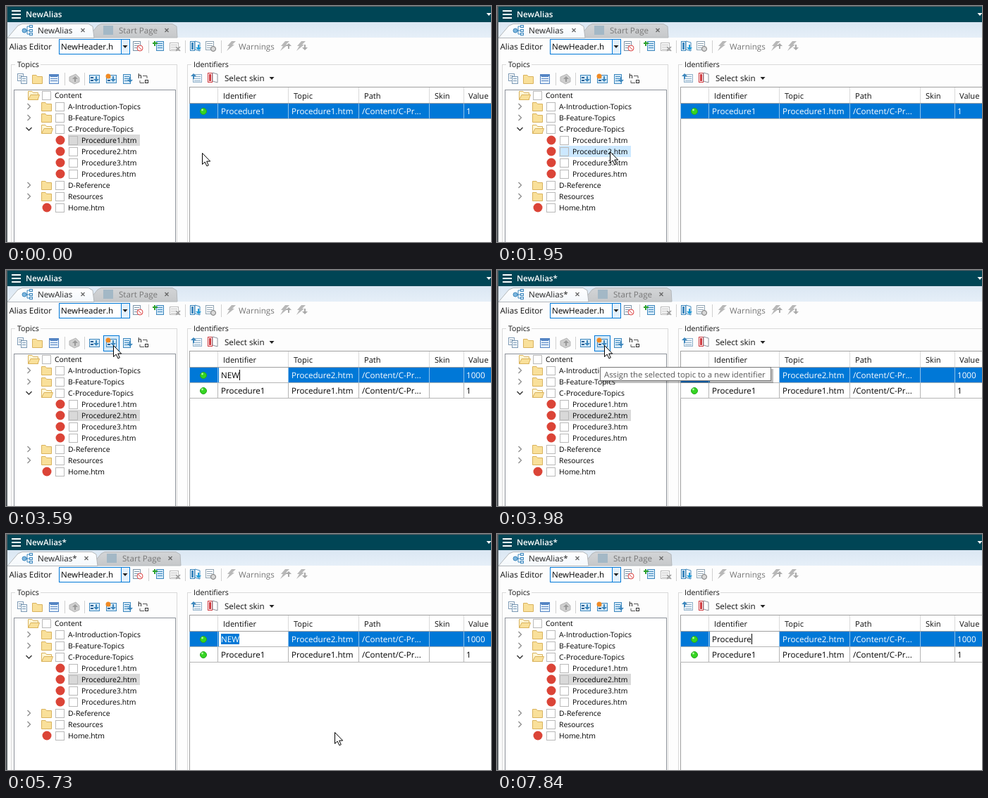
An HTML page with a canvas for the animation above (8 s loop, 688 by 336 pixels).

```html
<!DOCTYPE html>
<html lang="en">
<head>
<meta charset="utf-8">
<title>Alias editor</title>
<style>
html, body { margin: 0; width: 100%; height: 100%; overflow: hidden; background: #fdfdfd; }
canvas { display: block; }
</style>
</head>
<body>
<canvas id="stage" width="688" height="336"></canvas>
<script>
const ctx = document.getElementById('stage').getContext('2d');
const LOOP = 8000;
const BLUE = '#0078d7', LINE = '#d9d9d9', ICON = '#3d87bd', PALE = '#d6eaf8', GREY = '#b8b8b8';

// Moments at which the interface changes state
const PICK = 1830, HOVER = 3200, PRESS = 3350, ADD = 3470, RENAME_TAB = 3600, TOOLTIP = 3720,
      TAB_SHIFT = 3860, LEAVE = 4130, TIP_HIDE = 4400, CARET_OFF = 4790, SELECT = 5060, BLINK = 5730;
const KEYS = [6260, 6660, 6780, 7180, 7310, 7450, 7570, 7720, 7840];

// Pointer steps: time, x, y, shape
const POINTER = [
  [0, 278, 209], [710, 277, 209], [860, 269, 208], [1010, 233, 208], [1160, 190, 207],
  [1290, 166, 207], [1430, 160, 207], [2540, 159, 205], [2690, 155, 188], [2810, 147, 159],
  [2930, 145, 130], [3050, 146, 117], [3200, 152, 107], [4130, 381, 158], [4250, 374, 158],
  [4400, 373, 176], [4550, 366, 156, 'beam'], [4670, 362, 154, 'beam'], [4790, 356, 154, 'beam'],
  [4910, 345, 154, 'beam'], [5060, 261, 150], [5180, 400, 230], [5300, 466, 282], [6260, 0, 0, 'none']
];

function rect(x, y, w, h, color) {
  ctx.fillStyle = color;
  ctx.fillRect(x, y, w, h);
}
function box(x, y, w, h, stroke, fill) {
  if (fill) rect(x, y, w, h, fill);
  ctx.strokeStyle = stroke;
  ctx.lineWidth = 1;
  ctx.strokeRect(x + .5, y + .5, w - 1, h - 1);
}
function path(points, { fill, stroke, width = 1, close = true }) {
  ctx.beginPath();
  for (let i = 0; i < points.length; i += 2) ctx.lineTo(points[i], points[i + 1]);
  if (close) ctx.closePath();
  if (fill) { ctx.fillStyle = fill; ctx.fill(); }
  if (stroke) { ctx.strokeStyle = stroke; ctx.lineWidth = width; ctx.stroke(); }
}
const polyline = (points, stroke, width = 1) => path(points, { stroke, width, close: false });
function disc(x, y, r, fill, stroke) {
  ctx.beginPath();
  ctx.arc(x, y, r, 0, 2 * Math.PI);
  if (fill) { ctx.fillStyle = fill; ctx.fill(); }
  if (stroke) { ctx.strokeStyle = stroke; ctx.lineWidth = 1; ctx.stroke(); }
}
function fade(top, bottom, from, to) {
  const gradient = ctx.createLinearGradient(0, top, 0, bottom);
  gradient.addColorStop(0, from);
  gradient.addColorStop(1, to);
  return gradient;
}
function setFont(size, bold) {
  ctx.font = `${bold ? 600 : 400} ${size}px "Open Sans", sans-serif`;
}
function text(str, x, y, { size = 11.6, color = '#000', bold = false } = {}) {
  setFont(size, bold);
  ctx.fillStyle = color;
  ctx.fillText(str, x, y);
}
function widthOf(str) {
  setFont(11.6);
  return ctx.measureText(str).width;
}
const down = (x, y, color = '#222') => path([x - 3.5, y - 2, x + 3.5, y - 2, x, y + 2], { fill: color });
const separator = (x, y) => rect(x, y, 1, 18, '#d0d0d0');

// Icons, placed by their centre
function page(x, y, color = ICON, w = 10, h = 12, fill = '#fff') {
  const left = Math.round(x - w / 2), top = Math.round(y - h / 2);
  box(left, top, w, h, color, fill);
  for (let i = 3; i < h - 2; i += 3) rect(left + 2, top + i, w - 4, 1, color);
}
function folder(x, y, open) {
  const edge = '#d9b25c';
  path([x - 7.5, y - 5.5, x - 2, y - 5.5, x - .5, y - 3.5, x + 6.5, y - 3.5, x + 6.5, y + 6.5, x - 7.5, y + 6.5],
    { fill: open ? '#fff6d6' : '#f9e09a', stroke: edge });
  if (open) path([x - 7.5, y + 6.5, x - 4, y - .5, x + 8.5, y - .5, x + 6, y + 6.5], { fill: '#f9e09a', stroke: edge });
}
function bolt(x, y) {
  path([x + 1, y - 7, x + 7, y - 7, x + 2, y - 2, x + 5, y - 2, x - 6, y + 7, x - 2, y, x - 5, y], { fill: GREY });
}
function arrow(x, y, color, dir) {
  path([x - 4, y, x, y + 4 * dir, x + 4, y], { fill: color });
  rect(x - 1, Math.min(y, y - 4 * dir), 2, 4, color);
}
function cross(x, y, r, color, width = 1.2) {
  polyline([x - r, y - r, x + r, y + r], color, width);
  polyline([x + r, y - r, x - r, y + r], color, width);
}
function plus(x, y, color) {
  rect(x - 3, y - 1, 7, 2, color);
  rect(x - 1, y - 3, 2, 7, color);
}
function assignIcon(x, y, star) {
  box(x - 7, y - 5, 15, 12, ICON, PALE);
  rect(x - 5, y - 2, 4, 2, '#2a5f94');
  rect(x - 5, y + 2, 4, 2, '#2a5f94');
  arrow(x + 3, y + 1, ICON, 1);
  if (star) disc(x - 4, y - 3, 3.5, '#f08a24');
}
function book(x, y, left, right) {
  box(x - 7, y - 7, 7, 14, left, '#fff');
  rect(x - 5, y - 5, 3, 10, left);
  path([x, y - 7, x + 7, y - 5, x + 7, y + 7, x, y + 5], { fill: '#fff', stroke: right });
}

function drawTitleAndTabs(t) {
  const name = t < RENAME_TAB ? 'NewAlias' : 'NewAlias*';
  const grow = t < RENAME_TAB ? 0 : 5, shift = t < TAB_SHIFT ? 0 : 5;
  rect(0, 1, 688, 22, '#004555');
  for (const y of [6, 11, 16]) rect(8, y, 13, 2, '#fff');
  text(name, 28, 16, { color: '#fff', bold: true });
  down(685, 12, '#fff');

  rect(0, 23, 688, 22, fade(23, 45, '#dbe7f3', '#e6eff8'));
  const s = shift;
  path([116 + s, 45, 130 + s, 28, 135 + s, 25.5, 236 + s, 25.5, 242 + s, 29, 243 + s, 45],
    { fill: fade(25, 45, '#d3d5d7', '#c6c8ca'), stroke: '#b3b7ba' });
  rect(138 + s, 28, 14, 13, '#a3b8c6');
  text('Start Page', 160 + s, 38.5, { color: '#777' });
  cross(228 + s, 34.5, 2.5, '#666');

  path([2, 45.5, 17, 28, 23, 25.5, 117 + s, 25.5, 123 + s, 29, 125 + s, 45.5],
    { fill: fade(25, 45, '#fff', '#f4f8fc'), stroke: '#b3b7ba' });
  for (const y of [29, 35, 40]) polyline([25, 35, 30, 35, 30, y, 34, y], ICON);
  disc(26, 35, 3, '#7db6de', ICON);
  for (const y of [27, 33, 38]) box(33, y, 5, 4, ICON, PALE);
  text(name, 45, 38.5, { color: '#222' });
  cross(109 + grow, 34.5, 2.5, '#666');
}

function drawEditorBar() {
  rect(0, 45, 688, 291, '#fdfdfd');
  text('Alias Editor', 4.5, 61.5, { color: '#111' });
  box(75, 47, 101, 22, BLUE, '#fff');
  box(163, 47, 13, 22, BLUE, '#e5f1fb');
  down(169, 58);
  text('NewHeader.h', 78, 62);

  page(185, 57, '#7a93a8', 11, 14);
  disc(190, 60, 4, '#fff', '#d44');
  polyline([187.5, 57.5, 192.5, 62.5], '#d44');
  separator(202, 49);
  page(218, 57, ICON, 11, 14, PALE);
  plus(211, 53, '#2da12d');
  page(238, 58, GREY, 13, 12);
  cross(244, 61, 3, '#999', 1.6);
  separator(254, 49);
  book(268, 57, ICON, ICON);
  arrow(273, 59, '#1f9bd8', 1);
  page(289, 56, '#8fa3b2', 12, 13);
  disc(294, 61, 3.5, '#d8d8d8', '#777');
  separator(305, 49);
  bolt(319, 57);
  text('Warnings', 330, 61.5, { color: '#777' });
  bolt(395, 57);
  arrow(401, 57, '#aaa', -1);
  bolt(418, 57);
  arrow(424, 59, '#aaa', 1);
}

function group(label, x, w, labelWidth) {
  box(x, 83, w, 260, LINE);
  rect(x + 6, 82, labelWidth, 5, '#fdfdfd');
  text(label, x + 9, 86.5, { size: 10.6, color: '#111' });
}

function drawTopicsBar(t) {
  group('Topics', 7, 236, 36);
  page(20, 101, '#7f9bb5', 9, 11);
  page(25, 105, '#7f9bb5', 9, 11, '#eef5fb');
  folder(45, 104);
  page(68, 104, '#5585c4', 14, 14, '#e4effa');
  rect(61, 97, 14, 3, '#5585c4');
  separator(83, 95);
  path([90, 101, 99, 97, 104, 102, 104, 108, 97, 111, 90, 107], { fill: '#cfcfcf', stroke: '#b5b5b5' });
  arrow(98, 104, '#999', -1);
  separator(111, 95);
  if (t >= HOVER && t < LEAVE) box(138, 93, 23, 23, BLUE, t >= PRESS && t < ADD ? '#b3d7f3' : PALE);
  assignIcon(125, 103, false);
  assignIcon(149, 103, true);
  page(171, 104, ICON, 11, 14, PALE);
  arrow(176, 105, ICON, 1);
  text('h', 187, 103, { size: 9, color: '#222', bold: true });
  polyline([194, 99.5, 200, 99.5, 200, 103], '#555');
  box(197, 105, 5, 5, '#333', '#fff');
  polyline([190, 106, 190, 109.5, 196, 109.5], '#555');
}

function treeRow(y, label, level, kind, highlight) {
  const iconX = [39, 58, 77][level], boxX = [51, 70, 89][level];
  if (highlight) rect(boxX - 1, y - 8, 102, 16, highlight);
  if (kind === 'file') disc(iconX, y, 6.5, '#db4437');
  else folder(iconX, y, kind === 'open');
  if (kind === 'closed') polyline([30.5, y - 4, 34.5, y, 30.5, y + 4], '#888', 1.2);
  if (kind === 'open' && level) polyline([28.5, y - 2, 32.5, y + 2, 36.5, y - 2], '#333', 1.4);
  box(boxX, y - 6, 13, 13, '#b9b9b9', highlight || '#fff');
  text(label, boxX + 18, y + 4, { size: 10.4 });
}

function drawTree(t) {
  box(11, 119, 230, 230, '#8c9199', '#fff');
  const selected = t < PICK ? 'Procedure1.htm' : 'Procedure2.htm';
  const tint = t >= PICK && t < ADD ? '#cce8ff' : '#d9d9d9';
  const rows = [
    ['Content', 0, 'open'], ['A-Introduction-Topics', 1, 'closed'], ['B-Feature-Topics', 1, 'closed'],
    ['C-Procedure-Topics', 1, 'open'], ['Procedure1.htm', 2, 'file'], ['Procedure2.htm', 2, 'file'],
    ['Procedure3.htm', 2, 'file'], ['Procedures.htm', 2, 'file'], ['D-Reference', 1, 'closed'],
    ['Resources', 1, 'closed'], ['Home.htm', 1, 'file']
  ];
  rows.forEach(([label, level, kind], i) =>
    treeRow(127 + 16 * i, label, level, kind, label === selected && tint));
}

const COLUMNS = [260, 300, 400, 500, 600, 649];
function gridRow(y, cells, selected) {
  rect(261, y, 427, 21, selected ? BLUE : '#fff');
  rect(261, y + 21, 427, 1, '#b5b5b5');
  for (const x of COLUMNS) rect(x, y, 1, 22, selected ? '#8fc1ea' : '#b5b5b5');
  disc(280, y + 11, 4.5, '#35d522', '#25a51f');
  disc(278.5, y + 9, 1.4, '#b0f7a2');
  const color = selected ? '#fff' : '#000';
  cells.forEach((cell, i) => text(cell, COLUMNS[i + 1] + (i === 4 ? 4 : 5), y + 15, { color }));
}

function drawCell(t) {
  const x = 305;
  const typed = KEYS.filter(time => t >= time).length;
  const value = typed ? 'Procedure'.slice(0, typed) : 'NEW';
  const selecting = t >= SELECT && !typed;
  rect(302, 139, 98, 21, '#fff');
  if (selecting) rect(x, 142, widthOf(value), 15, BLUE);
  text(value, x, 154, { color: selecting ? '#fff' : '#000' });
  if (selecting) {
    if (t < BLINK) rect(x, 142, 1, 15, '#ff8728');
  } else if (typed || t < CARET_OFF) {
    rect(Math.round(x + widthOf(value)), 142, 1, 15, '#000');
  }
}

function drawIdentifiers(t) {
  group('Identifiers', 257, 440, 54);
  page(271, 103, '#8fb0c9', 13, 12, '#eef5fb');
  arrow(266, 100, ICON, -1);
  book(293, 102, '#d0393e', '#8a8f9a');
  text('Select skin', 310, 106.5, { color: '#111' });
  down(377, 103);

  box(260, 115, 440, 230, '#a0a0a0', '#fff');
  ['Identifier', 'Topic', 'Path', 'Skin', 'Value'].forEach((name, i) => {
    rect(COLUMNS[i + 1], 116, 1, 22, LINE);
    text(name, COLUMNS[i + 1] + (i === 4 ? 7 : 8), 132, { size: 11.1, color: '#111' });
  });
  rect(261, 138, 427, 1, '#a0a0a0');

  const procedure1 = ['Procedure1', 'Procedure1.htm', '/Content/C-Pr...', '', '1'];
  if (t >= ADD) {
    gridRow(139, ['', 'Procedure2.htm', '/Content/C-Pr...', '', '1000'], true);
    gridRow(161, procedure1, false);
    drawCell(t);
  } else {
    gridRow(139, procedure1, true);
  }
}

function drawTooltip() {
  rect(149, 141, 243, 20, 'rgba(0,0,0,.25)');
  box(146, 138, 243, 20, '#767676', '#fff');
  text('Assign the selected topic to a new identifier', 152, 152.5, { size: 11.35, color: '#575757' });
}

function drawPointer(t) {
  const [, x, y, shape] = POINTER.findLast(step => t >= step[0]);
  if (shape === 'none') return;
  ctx.save();
  ctx.translate(x + .5, y + .5);
  if (shape === 'beam') {
    polyline([-3, -7, 0, -6, 3, -7], '#000');
    polyline([0, -6, 0, 6], '#000');
    polyline([-3, 7, 0, 6, 3, 7], '#000');
  } else {
    path([0, 0, 0, 16, 3.7, 12.6, 6.4, 18.4, 8.8, 17.3, 6.2, 11.6, 11.2, 11.6], { fill: '#fff', stroke: '#000' });
  }
  ctx.restore();
}

function drawWindowEdge() {
  rect(0, 0, 688, 1, '#5a5f63');
  rect(0, 0, 2, 336, '#5a5f63');
}

function draw(now) {
  const t = now % LOOP;
  ctx.textRendering = 'geometricPrecision';
  drawEditorBar();
  drawTitleAndTabs(t);
  drawTopicsBar(t);
  drawTree(t);
  drawIdentifiers(t);
  drawWindowEdge();
  if (t >= TOOLTIP && t < TIP_HIDE) drawTooltip();
  drawPointer(t);
}

const start = performance.now();
function tick() {
  draw(performance.now() - start);
  requestAnimationFrame(tick);
}
tick();
</script>
</body>
</html>
```
